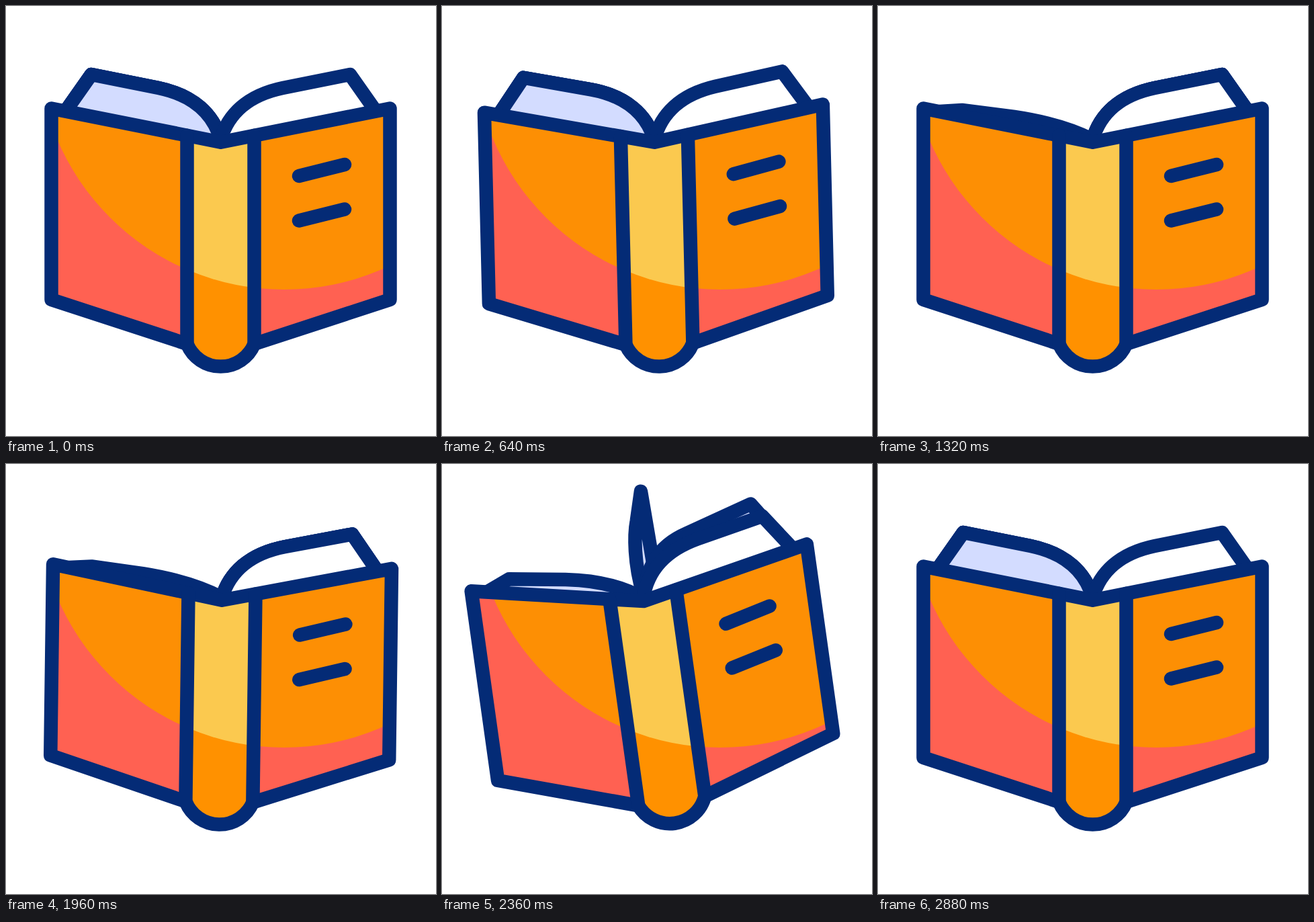
An HTML page that plays this animation: 640x640 px, repeating every 3440 ms.

```html
<!DOCTYPE html>
<html lang="en">
<head>
<meta charset="utf-8">
<title>Book</title>
<style>
  @property --tilt {
    syntax: "<angle>";
    inherits: true;
    initial-value: 0deg;
  }
  html, body { margin: 0; width: 100%; height: 100%; overflow: hidden; background: #fff; }
  svg { display: block; width: 100%; height: 100%; animation: rock 3.44s infinite; }

  .book, .light { transform-box: view-box; transform-origin: 319.5px 342px; }
  .book { transform: rotate(var(--tilt)); }
  .light { transform: rotate(calc(-1 * var(--tilt))); }

  .line { fill: none; stroke: #042b76; stroke-width: 20.5; stroke-linecap: round; stroke-linejoin: round; }
  .page { fill: #d3dcff; }
  .right { fill: #fff; }

  .stack { animation: sink 3.44s linear infinite; }
  .leaf { animation: turn 3.44s linear infinite; }
  .second { animation-delay: .19s; }

  @keyframes rock {
    0%, 9.302% { --tilt: 0deg; animation-timing-function: cubic-bezier(.37, 0, .63, 1); }
    13.953% { --tilt: -8.5deg; animation-timing-function: cubic-bezier(.37, 0, .63, 1); }
    22.093% { --tilt: 3deg; animation-timing-function: cubic-bezier(.4, .1, .8, .8); }
    27.907%, 55.814% { --tilt: 0deg; animation-timing-function: cubic-bezier(.2, .2, .6, .9); }
    61.628% { --tilt: 3deg; animation-timing-function: cubic-bezier(.37, 0, .63, 1); }
    69.767% { --tilt: -8.5deg; animation-timing-function: cubic-bezier(.37, 0, .63, 1); }
    74.419%, 100% { --tilt: 0deg; }
  }

  /* the left pages get thin, then thick again */
  @keyframes sink {
    0%, 18.605% {
      d: path("M89 156L127 102L227 122C280 133 309 162 319.5 199");
      animation-timing-function: ease-in-out;
    }
    38.372%, 63.953% { d: path("M92 157L125 155L203 165C250 172 290 184 319.5 199"); }
    83.721%, 100% { d: path("M89 156L127 102L227 122C280 133 309 162 319.5 199"); }
  }

  /* one leaf turns to the right, later back to the left */
  @keyframes turn {
    0%, 20.93% { d: path("M89 156L127 102L227 122C280 133 309 162 319.5 199"); }
    23.547% { d: path("M152 141L190 83L274 119C298 130 314 154 321 190"); }
    25.872% { d: path("M275 175L295 61L314 102C322 120 323 150 321 192"); }
    29.07% { d: path("M396 150L395.5 64L352 114C343 126 343 155 324 192"); }
    32.558%, 61.628% { d: path("M550 156L512 102L412 122C359 133 330 162 319.5 199"); }
    63.081% { d: path("M540 144L498 82L397 112C350 125 331 155 319.5 196"); }
    68.605% { d: path("M343 165L339 40L326 83C319 103 313 145 320 192"); }
    72.674% { d: path("M152 141L190 83L274 119C298 130 314 154 321 190"); }
    77.035%, 100% { d: path("M89 156L127 102L227 122C280 133 309 162 319.5 199"); }
  }
</style>
</head>
<body>
<svg viewBox="0 0 640 640">
  <defs>
    <path id="covers" d="M67.5 152.5L319.5 202.7L571.5 152.5V437L369.5 503H269.5L67.5 437Z"/>
    <path id="spine" d="M269.5 192.8L319.5 202.7L369.5 192.8V503A54 54 0 0 1 269.5 503Z"/>
    <clipPath id="inCovers"><use href="#covers"/></clipPath>
    <clipPath id="inSpine"><use href="#spine"/></clipPath>
    <circle id="glow" class="light" cx="414" cy="55" r="367"/>
  </defs>

  <g class="book">
    <path class="line page leaf" d="M89 156L127 102L227 122C280 133 309 162 319.5 199"/>
    <path class="line page leaf second" d="M89 156L127 102L227 122C280 133 309 162 319.5 199"/>
    <path class="line page stack" d="M89 156L127 102L227 122C280 133 309 162 319.5 199"/>
    <path class="line right" d="M550 156L512 102L412 122C359 133 330 162 319.5 199"/>

    <use href="#covers" fill="#ff6152"/>
    <g clip-path="url(#inCovers)" fill="#fd8f04"><use href="#glow"/></g>
    <use href="#spine" fill="#ff9100"/>
    <g clip-path="url(#inSpine)" fill="#fbc94f"><use href="#glow"/></g>

    <g class="line">
      <path d="M269.5 503L67.5 437V152.5L319.5 202.7L571.5 152.5V437L369.5 503"/>
      <path d="M269.5 192.8V503A54 54 0 0 0 369.5 503V192.8"/>
      <path d="M436 253L504 236M436 319.5L504 302.5"/>
    </g>
  </g>
</svg>
</body>
</html>
```
